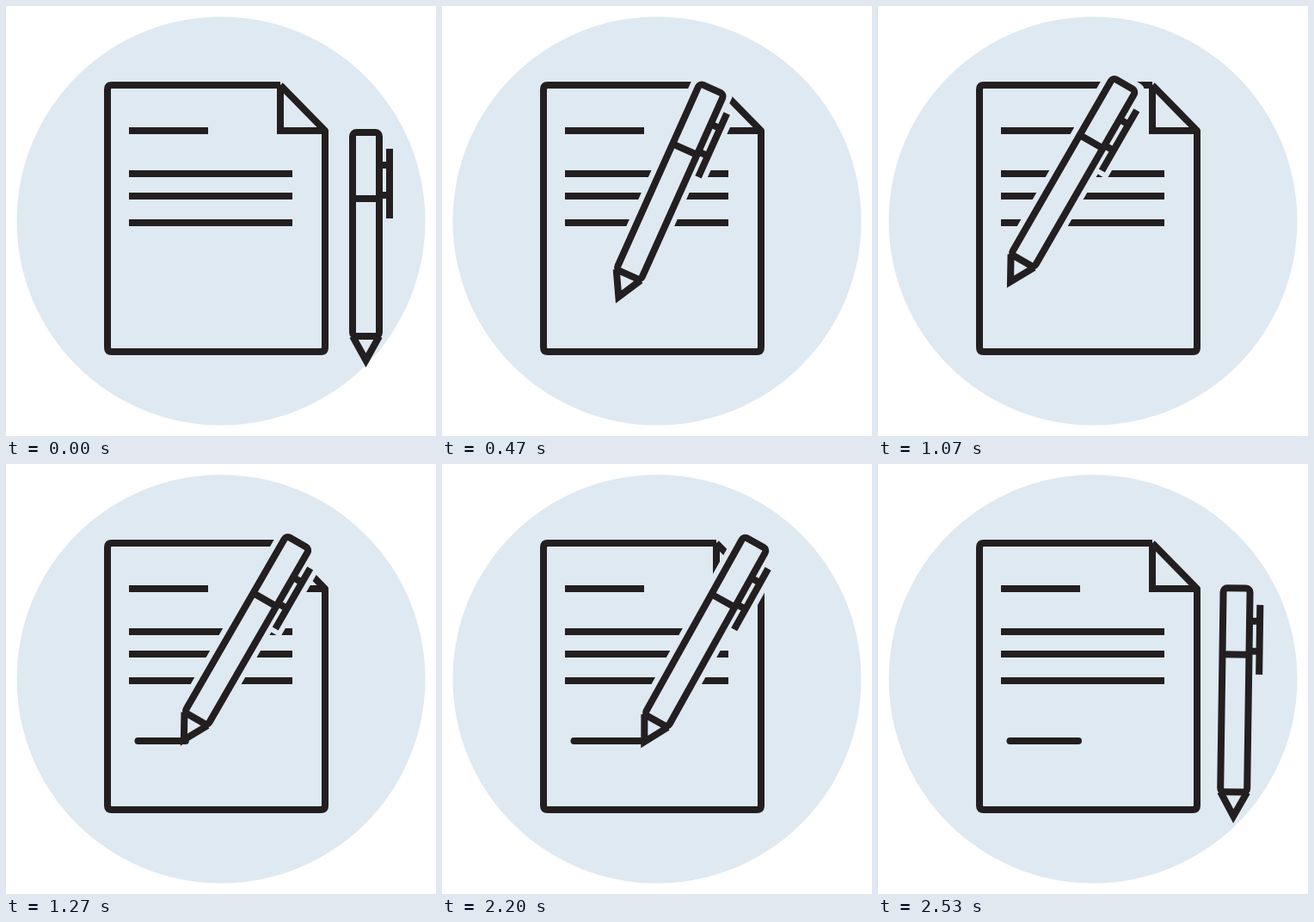
Recreate the animation shown at these times as an HTML page. Size 500 px wide and 500 px high, loop 2.56 s.

```html
<!DOCTYPE html>
<html lang="en">
<head>
<meta charset="utf-8">
<title>Signing a document</title>
<style>
  html, body { margin: 0; width: 100%; height: 100%; overflow: hidden; background: #fff; }
  svg { display: block; width: 100vw; height: 100vh; }
  .ink { fill: none; stroke: #231f20; stroke-width: 8; }
  .halo { fill: #dee9f1; stroke: #dee9f1; stroke-width: 20; }
</style>
</head>
<body>
<svg viewBox="0 0 500 500">
  <defs>
    <clipPath id="disc"><circle cx="250" cy="250" r="237.5"/></clipPath>
  </defs>
  <circle cx="250" cy="250" r="237.5" fill="#dee9f1"/>

  <g class="ink">
    <path stroke-linejoin="round" d="M319 92H123Q118 92 118 97V397Q118 402 123 402H366Q371 402 371 397V145L319 92"/>
    <path d="M319 92V145H372"/>
    <path d="M143 145H235M143 195H333M143 221H333M143 252H333"/>
  </g>

  <!-- clears the page around the pen -->
  <g clip-path="url(#disc)">
    <g class="halo pen">
      <path stroke-linejoin="round" d="M403 147H434V384L418.5 412L403 384Z"/>
      <path d="M446 160V253"/>
    </g>
  </g>

  <g class="ink pen">
    <rect x="403" y="147" width="31" height="237" rx="4.5"/>
    <path d="M403 224H434M434 185H446M434 220H446M446 166V247"/>
    <path d="M403 384L418.5 412L434 384"/>
  </g>

  <path id="signature" class="ink" stroke-linecap="round"/>
</svg>

<script>
const LOOP = 2560;
const TIP = { x: 418.5, y: 420 };
const REST = { x: 418.5, y: 420, angle: 0 };
const START = { x: 150, y: 327.5, angle: 30 };
const END = { x: 226, y: 327.5, angle: 30 };
const LINE = { from: 153.5, to: 233, y: 322 };

// Keyframes, counted in 25 fps steps
const ARRIVE = 27, WRITTEN = 41, LEAVE = 54, HOME = 64;

const pens = document.querySelectorAll('.pen');
const signature = document.getElementById('signature');

const clamp = v => Math.min(1, Math.max(0, v));
const lerp = (a, b, p) => a + (b - a) * p;
const span = (step, from, to) => clamp((step - from) / (to - from));
const smooth = t => t * t * (3 - 2 * t);

// cubic-bezier(1/3, 0, 0.04, 1): short start, long settle
function settle(t) {
  let low = 0, high = 1;
  for (let i = 0; i < 30; i++) {
    const s = (low + high) / 2, r = 1 - s;
    if (s * r * r + 0.12 * s * s * r + s * s * s < t) low = s;
    else high = s;
  }
  return smooth((low + high) / 2);
}

// 25 fps steps shown on a 30 fps clock: every sixth tick repeats
function stepAt(ms) {
  const tick = Math.floor((ms + 4) * 30 / 1000);
  return tick - Math.floor((tick + 3) / 6);
}

function blend(a, b, p) {
  return { x: lerp(a.x, b.x, p), y: lerp(a.y, b.y, p), angle: lerp(a.angle, b.angle, p) };
}

function poseAt(step) {
  if (step <= ARRIVE) return blend(REST, START, settle(span(step, 0, ARRIVE)));
  if (step <= LEAVE) return blend(START, END, settle(span(step, ARRIVE, WRITTEN)));
  return blend(END, REST, smooth(span(step, LEAVE, HOME)));
}

function draw(ms) {
  const step = stepAt(ms % LOOP) % HOME;
  const { x, y, angle } = poseAt(step);
  const move = `translate(${x} ${y}) rotate(${angle}) translate(${-TIP.x} ${-TIP.y})`;
  pens.forEach(pen => pen.setAttribute('transform', move));

  const end = lerp(LINE.from, LINE.to, settle(span(step, ARRIVE, WRITTEN)));
  signature.setAttribute('d', step > ARRIVE ? `M${LINE.from} ${LINE.y}H${end}` : '');
}

const began = performance.now();
function frame() {
  draw(performance.now() - began);
  requestAnimationFrame(frame);
}
frame();
</script>
</body>
</html>
```
